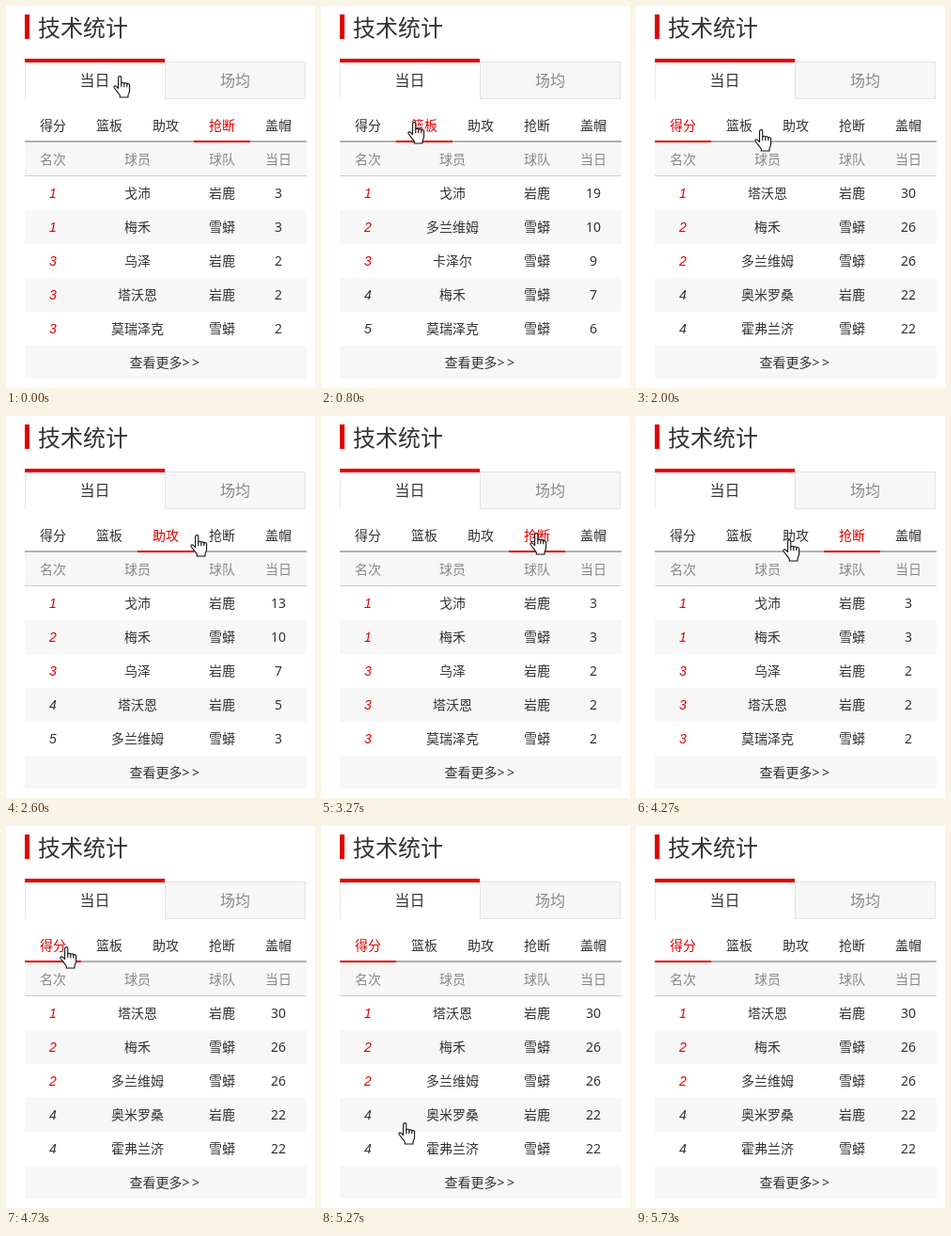
Animation of 329 by 406 pixels, one loop 6.27 s. Source, as an HTML page:

```html
<!DOCTYPE html>
<html lang="zh-CN">
<head>
<meta charset="utf-8">
<title>技术统计</title>
<style>
  * { box-sizing: border-box; }
  html, body { margin: 0; width: 100%; height: 100%; overflow: hidden; background: #fff; }
  body { --red: #dd0000; font: 14px/36px "Noto Sans", "Noto Sans CJK SC", "Noto Sans CJK", sans-serif; color: #333; }
  #stage { position: relative; width: 329px; height: 406px; overflow: hidden; }
  #stage > * { position: absolute; }
  h1 { left: 20px; top: 9px; height: 26px; margin: 0; padding-left: 9px;
       border-left: 5px solid var(--red); font-size: 24px; line-height: 27px; font-weight: 400; }
  .period { top: 56px; height: 43px; font-size: 16px; line-height: 38px; text-align: center; }
  .day { left: 20px; width: 149px; border-top: 4px solid var(--red); box-shadow: inset 1px 0 #e8e8e8; }
  .avg { left: 169px; top: 59px; width: 150px; height: 40px; color: #888;
         background: #f7f7f7; border: 1px solid #e3e3e3; }
  #tabs { left: 20px; top: 109px; width: 300px; height: 36px; display: flex; }
  #tabs span { width: 60px; text-align: center; border-bottom: 2px solid #b0b0b0; }
  #tabs .on { color: var(--red); border-color: var(--red); }
  #head, .view { left: 20px; width: 300px; }
  #head { top: 145px; background: #f7f7f7; color: #888; border-bottom: 1px solid #ccc; }
  .view { top: 181px; visibility: hidden; }
  .view.on { visibility: visible; }
  .row { display: grid; grid-template-columns: 60px 120px 60px 60px; height: 36px; text-align: center; }
  .view .row:nth-child(even) { background: #f7f7f7; }
  .rank { font: italic 14px/36px "Liberation Sans", Arial, sans-serif; }
  .top { color: var(--red); }
  #more { left: 20px; top: 361px; width: 300px; height: 35px; background: #f7f7f7; text-align: center; }
  #more span { letter-spacing: 2.5px; }
  #hand { left: 0; top: 0; }
</style>
</head>
<body>
<div id="stage">
  <h1>技术统计</h1>
  <div class="period day">当日</div>
  <div class="period avg">场均</div>
  <div id="tabs"></div>
  <div id="head" class="row"><span>名次</span><span>球员</span><span>球队</span><span>当日</span></div>
  <div id="more">查看更多<span>&gt;&gt;</span></div>
  <svg id="hand" width="19" height="24" viewBox="0 0 19 24" fill="#fff" stroke="#111" stroke-width="1.1" stroke-linejoin="round">
    <path d="M5.6 13.5V2.2a1.6 1.6 0 0 1 3.2 0V8.6a1.5 1.5 0 0 1 3 .4 1.5 1.5 0 0 1 3 .7 1.4 1.4 0 0 1 2.8 .8V16c0 2-1.6 3.4-1.6 5v2H7.3V21C6 18.5 2.8 15.5 1.1 12.8c-.7-1.5 1-2.6 2.3-1.5z"/>
    <path d="M8.8 8.6v3.6M11.8 9v3.2M14.8 9.7v2.5" fill="none"/>
  </svg>
</div>
<script>
  const LOOP = 6270, TICK = 200 / 3, HOVER_DELAY = 3;
  const $ = id => document.getElementById(id);

  const rocks = ['戈沛', '乌泽', '塔沃恩', '奥米罗桑'];
  const stats = {
    得分: '塔沃恩 30,梅禾 26,多兰维姆 26,奥米罗桑 22,霍弗兰济 22',
    篮板: '戈沛 19,多兰维姆 10,卡泽尔 9,梅禾 7,莫瑞泽克 6',
    助攻: '戈沛 13,梅禾 10,乌泽 7,塔沃恩 5,多兰维姆 3',
    抢断: '戈沛 3,梅禾 3,乌泽 2,塔沃恩 2,莫瑞泽克 2',
    盖帽: '戈沛 2,霍弗兰济 2,乌泽 1,卡泽尔 1,莫瑞泽克 1'
  };

  // Equal values share the rank of the first of them
  function tableHtml(text) {
    const rows = text.split(',').map(row => row.split(' '));
    return rows.map(([name, value]) => {
      const rank = rows.findIndex(row => row[1] === value) + 1;
      return `<div class="row"><span class="rank ${rank < 4 ? 'top' : ''}">${rank}</span>` +
        `<span>${name}</span><span>${rocks.includes(name) ? '岩鹿' : '雪蟒'}</span><span>${value}</span></div>`;
    }).join('');
  }

  const panes = Object.entries(stats).map(([label, text]) => {
    const tab = document.createElement('span');
    tab.textContent = label;
    $('tabs').append(tab);
    const view = document.createElement('div');
    view.className = 'view';
    view.innerHTML = tableHtml(text);
    $('stage').insertBefore(view, $('more'));
    return [tab, view];
  });

  // Pointer moves: first tick, last tick, x, y reached
  const home = [114, 74];
  const moves = [
    [6, 10, 92, 123],
    [20, 23, 32, 125],
    [27, 30, 126, 131],
    [30, 35, 190, 127],
    [37, 41, 202, 124],
    [42, 45, 218, 124],
    [48.9, 50.5, 278, 125],
    [58, 64, 156, 131],
    [64, 68, 57, 128],
    [71, 78, 72, 301],
    [78, 86, 150, 410]
  ];

  function pointerAt(tick) {
    let [x, y] = home;
    for (const [from, to, nextX, nextY] of moves) {
      const k = Math.min(1, Math.max(0, (tick - from) / (to - from)));
      x += (nextX - x) * k;
      y += (nextY - y) * k;
    }
    return [Math.round(x), Math.round(y)];
  }

  // The last tab hovered, seen after a short delay
  function activeTab(tick) {
    for (let t = tick - HOVER_DELAY; t >= 0; t--) {
      const [x, y] = pointerAt(t);
      if (y >= 109 && y < 145) return Math.floor((x + 7 - 20) / 60);
    }
    return 3;
  }

  function draw(ms) {
    const tick = Math.floor((ms % LOOP + 7) / TICK);
    const active = activeTab(tick);
    panes.forEach((pane, i) => pane.forEach(el => el.classList.toggle('on', i === active)));
    const [x, y] = pointerAt(tick);
    $('hand').style.transform = `translate(${x}px, ${y}px)`;
  }

  const start = performance.now();
  function loop() {
    draw(performance.now() - start);
    requestAnimationFrame(loop);
  }
  loop();
</script>
</body>
</html>
```
